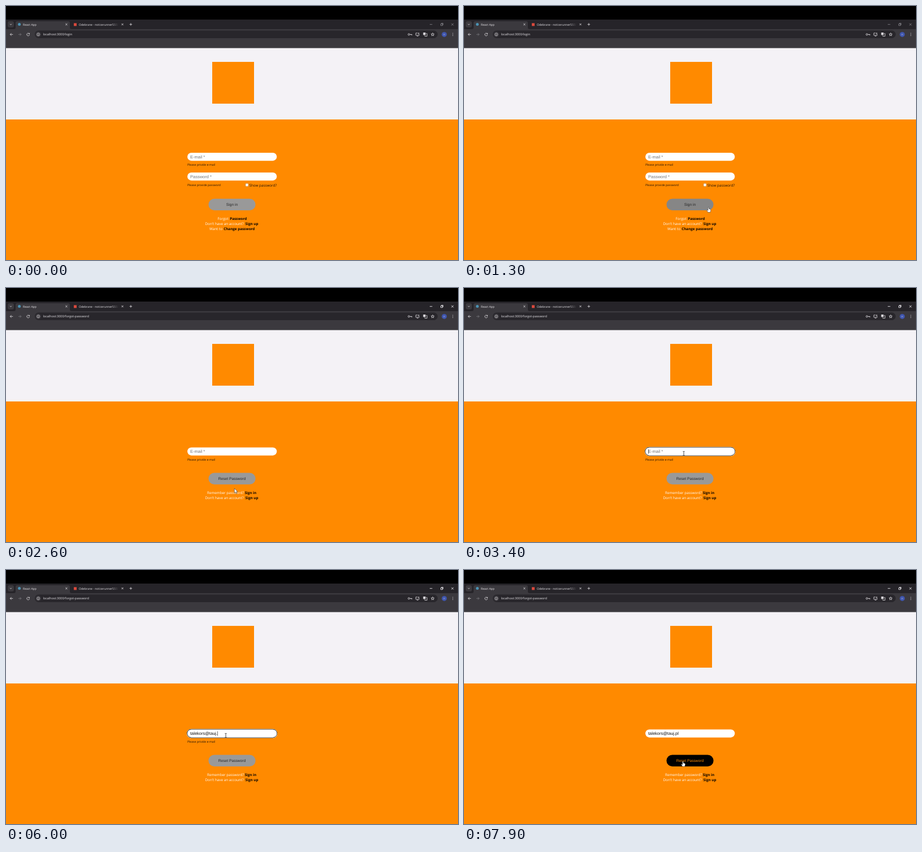
An HTML page that plays this animation: 800 by 450 pixels, repeating every 8 s.

```html
<!DOCTYPE html>
<html lang="en">
<head>
<meta charset="utf-8">
<title>Password reset</title>
<style>
html, body { margin: 0; width: 100%; height: 100%; overflow: hidden; background: #000; }
svg { display: block; width: 800px; height: 450px; }
text { font-family: "Open Sans", "Noto Sans", sans-serif; text-rendering: geometricPrecision; white-space: pre; }
.ui { font-size: 5.1px; fill: #e8e6ea; }
.url { font-size: 5.5px; fill: #e9e7eb; }
.field, .btn { font-family: "Liberation Sans", Arial, sans-serif; }
.field { font-size: 7.5px; fill: #111; }
.hint { fill: #757575; }
.btn { font-size: 6.67px; text-anchor: middle; fill: #262626; }
.err { font-size: 5.12px; fill: #1d1208; }
.link { font-size: 6.3px; fill: #fff; }
.link.b { font-weight: 700; fill: #0a0500; }
.ico { fill: none; stroke: #d8d6da; stroke-width: .85; }
</style>
</head>
<body>
<svg viewBox="0 0 800 450">
  <defs>
    <linearGradient id="fade"><stop offset="0" stop-color="#262429" stop-opacity="0"/><stop offset="1" stop-color="#262429"/></linearGradient>
    <clipPath id="tabClip"><rect x="128" y="26" width="70.5" height="14"/></clipPath>
  </defs>

  <!-- browser window -->
  <rect width="800" height="450"/>
  <rect y="24" width="800" height="18" fill="#262429"/>
  <rect y="41" width="800" height="33.5" fill="#3b393e"/>
  <path d="M14 41Q17 41 17 38V30Q17 27 20 27H110Q113 27 113 30V38Q113 41 116 41Z" fill="#3b393e"/>
  <rect x="3" y="27" width="11" height="11" rx="3.2" fill="#3b393e"/>
  <path class="ico" d="M6.9 31.8l1.6 1.6 1.6-1.6"/>
  <circle cx="23.6" cy="32.6" r="2.5" fill="#4b93b4"/>
  <text class="ui" x="30" y="34.6">React App</text>
  <rect x="120" y="30.4" width="5" height="5" fill="#d9493c"/>
  <g clip-path="url(#tabClip)"><text class="ui" x="129" y="34.6">Odebrane - noticerunner55555</text></g>
  <rect x="188" y="28" width="11" height="11" fill="url(#fade)"/>
  <path class="ico" d="M105.3 31l3.2 3.2m0-3.2l-3.2 3.2M204.5 31l3.2 3.2m0-3.2l-3.2 3.2M218.6 32.6h4.6m-2.3-2.3v4.6"/>
  <path class="ico" id="winBtns" d="M750 32.7h4.5M769.5 31.7h3v3h-3zM770.6 31.5v-1h3v3h-1M788.3 30.8l3.8 3.8m0-3.8l-3.8 3.8"/>

  <rect x="51" y="43.5" width="713" height="13.6" rx="6.8" fill="#28262b"/>
  <path class="ico" d="M12.3 50.4H7.4m2.2-2.3l-2.3 2.3 2.3 2.3"/>
  <path class="ico" d="M22 50.4h4.8m-2.2-2.3l2.3 2.3-2.3 2.3" style="stroke:#77757a"/>
  <path class="ico" d="M41.2 49.1A2.4 2.4 0 1 0 41.6 51M41.6 47.8v1.8h-1.8"/>
  <circle cx="57.2" cy="50.4" r="4.8" fill="#3b393e"/>
  <circle class="ico" cx="57.2" cy="50.4" r="2.5" style="stroke-width:.7"/>
  <path class="ico" d="M57.2 50v1.7m0-2.9v.6"/>
  <text class="url" id="url" x="65.5" y="52.3"></text>
  <circle class="ico" cx="713" cy="50.4" r="1.5"/>
  <path class="ico" d="M714.5 50.4h4v1.4m-1.5-1.4v1.2"/>
  <path class="ico" d="M728.5 47.9h-3.2v4h6v-1.7M727 53.3h2.8M730.3 47v2.6m-1.2-1.2l1.2 1.2 1.2-1.2"/>
  <rect x="738.4" y="47" width="4.2" height="4.6" rx=".6" fill="#d8d6da"/>
  <path class="ico" d="M743.4 48.8h1.8v4.8h-4v-1.4"/>
  <path class="ico" id="star"/>
  <circle cx="775.7" cy="50.4" r="4.5" fill="#3f55ad"/>
  <text x="775.7" y="52" font-size="4.6" fill="#dfe3f6" text-anchor="middle">n</text>
  <path d="M790.3 47.7h1v1h-1zM790.3 49.9h1v1h-1zM790.3 52.1h1v1h-1z" fill="#d8d6da"/>

  <!-- page -->
  <rect y="74.5" width="800" height="127" fill="#f4f2f6"/>
  <rect x="365" y="99" width="74" height="74" fill="#ff8a00"/>
  <rect y="201" width="800" height="249" fill="#ff8a00"/>

  <g id="login">
    <rect x="321" y="260" width="158.3" height="14.2" rx="7.1" fill="#fff"/>
    <text class="field hint" x="326" y="269.8">E-mail *</text>
    <text class="err" x="321" y="283.3">Please privide e-mail</text>
    <rect x="321" y="295" width="158.3" height="14.2" rx="7.1" fill="#fff"/>
    <text class="field hint" x="326" y="304.8">Password *</text>
    <text class="err" x="321" y="319">Please provide password</text>
    <rect x="424" y="314.6" width="4.8" height="4.8" rx=".8" fill="#fff" stroke="#8a7560" stroke-width=".4"/>
    <text class="link" x="430.5" y="319.6" style="fill:#1d1208">Show password?</text>
    <rect id="signBtn" x="358.4" y="341.4" width="83.2" height="20.6" rx="10.3"/>
    <text class="btn" x="400" y="354">Sign in</text>
    <text class="link" x="374.6" y="379.1">Forgot</text>
    <text class="link b" x="396.2" y="379.1">Password</text>
    <text class="link" x="352.5" y="387.9">Don't have an account?</text>
    <text class="link b" x="423.6" y="387.9">Sign up</text>
    <text class="link" x="360" y="396.7">Want to</text>
    <text class="link b" x="385.2" y="396.7">Change password</text>
  </g>

  <g id="forgot">
    <g id="ring">
      <rect x="319.8" y="281.4" width="160.6" height="16.4" rx="8.2" fill="#fff"/>
      <rect x="320.2" y="281.8" width="159.8" height="15.6" rx="7.8" fill="#101010"/>
    </g>
    <rect x="321" y="282.5" width="158.3" height="14.2" rx="7.1" fill="#fff"/>
    <text class="field" id="mail" x="326" y="292.3"></text>
    <rect id="caret" y="285.7" width=".6" height="8" fill="#111"/>
    <text class="err" id="mailErr" x="321" y="305.7">Please privide e-mail</text>
    <rect id="resetBtn" x="358.4" y="327.5" width="83.2" height="20.6" rx="10.3"/>
    <text class="btn" id="resetText" x="400" y="340.2">Reset Password</text>
    <text class="link" x="356" y="365.4">Remember password?</text>
    <text class="link b" x="422.4" y="365.4">Sign in</text>
    <text class="link" x="352.5" y="374.2">Don't have an account?</text>
    <text class="link b" x="423.6" y="374.2">Sign up</text>
  </g>

  <rect id="status" y="448.4" width="74.5" height="1.6" fill="#241d1a"/>

  <g id="pointer">
    <path id="arrow" d="M0 0V8.2L1.9 6.5 3.1 9.3 4.4 8.7 3.2 6H5.8Z" fill="#fff" stroke="#111" stroke-width=".5"/>
    <path id="hand" d="M-.8.4Q0-.6.8.4V3L3 3.4Q4 3.7 4 4.6V6.6L3.2 9H-.8L-3 5.8Q-2.8 4.6-1.8 5L-.8 6Z" fill="#fff" stroke="#222" stroke-width=".5"/>
    <path id="beam" d="M-1.6-3.5H-.5L0-3.1.5-3.5H1.6M0-3.1V3.1M-1.6 3.5H-.5L0 3.1.5 3.5H1.6" fill="none" stroke="#111" stroke-width=".75"/>
  </g>
</svg>

<script>
const LOOP = 8000;
const ACTIVE = 2300, NAV = 2400, FOCUS = 3100, BLUR = 7800;
const MAIL = "talekors@tauj.pl";
const KEYS = [3700, 3900, 4440, 4500, 4570, 4640, 4700, 4790,
              5300, 5400, 5800, 5850, 5900, 5990, 6200, 6450];
// time, x, y of the pointer's hot spot
const PATH = [
  [500, 674, 405], [800, 540, 370], [1000, 450, 338], [1300, 432.7, 356.5],
  [1400, 432.7, 356.5], [1700, 438, 366], [2200, 410, 378.5], [2450, 410, 378.5],
  [3000, 389, 293], [7300, 389, 293], [7600, 389, 320], [7850, 387.5, 339]
];

const el = {};
document.querySelectorAll("svg [id]").forEach(n => el[n.id] = n);
const show = (n, on) => n.setAttribute("display", on ? "inline" : "none");
const within = (p, x0, y0, x1, y1) => p[0] >= x0 && p[0] <= x1 && p[1] >= y0 && p[1] <= y1;

let star = "";
for (let i = 0; i < 10; i++) {
  const r = i % 2 ? 1.3 : 2.9, a = i * Math.PI / 5;
  star += (i ? "L" : "M") + (755.2 + r * Math.sin(a)).toFixed(2) + " " + (50.5 - r * Math.cos(a)).toFixed(2);
}
el.star.setAttribute("d", star + "Z");

function pointerAt(t) {
  const i = PATH.findIndex(k => k[0] > t);
  if (i < 0) return PATH[PATH.length - 1].slice(1);
  if (!i) return PATH[0].slice(1);
  const a = PATH[i - 1], b = PATH[i], u = (t - a[0]) / (b[0] - a[0]);
  return [a[1] + (b[1] - a[1]) * u, a[2] + (b[2] - a[2]) * u];
}

function drawField(t) {
  const n = KEYS.filter(k => k <= t).length;
  const focused = t >= FOCUS && t < BLUR;
  const valid = n === MAIL.length;
  el.mail.textContent = n ? MAIL.slice(0, n) : "E-mail *";
  el.mail.classList.toggle("hint", !n);
  const x = 326 + (n ? el.mail.getComputedTextLength() : 0);
  el.caret.setAttribute("x", x);
  const since = t - (n ? KEYS[n - 1] : FOCUS);
  show(el.caret, focused && since % 1000 < 500);
  show(el.ring, focused);
  show(el.mailErr, !valid);
  el.resetBtn.setAttribute("fill", valid ? "#000" : "#999");
  el.resetText.style.fill = valid ? "#ff8a00" : "";
}

function draw(t) {
  const login = t < NAV, p = pointerAt(t);
  show(el.login, login);
  show(el.forgot, !login);
  el.url.textContent = "localhost:3000/" + (login ? "login" : "forgot-password");
  el.winBtns.style.stroke = t < ACTIVE ? "#85838a" : "#f0eef2";

  const top = login ? 341.4 : 327.5;
  const onBtn = within(p, 358, top, 442, top + 20.6);
  const onLink = login && within(p, 396, 372, 426, 381);
  const onField = !login && within(p, 321, 282, 479, 297);
  el.signBtn.setAttribute("fill", onBtn ? "#868686" : "#999");
  show(el.status, onLink);
  if (!login) drawField(t);

  show(el.pointer, t >= PATH[0][0]);
  el.pointer.setAttribute("transform", `translate(${p[0]} ${p[1]})`);
  show(el.hand, onBtn || onLink);
  show(el.beam, onField);
  show(el.arrow, !(onBtn || onLink || onField));
}

const start = performance.now();
function tick() {
  draw((performance.now() - start) % LOOP);
  requestAnimationFrame(tick);
}
tick();
</script>
</body>
</html>
```
